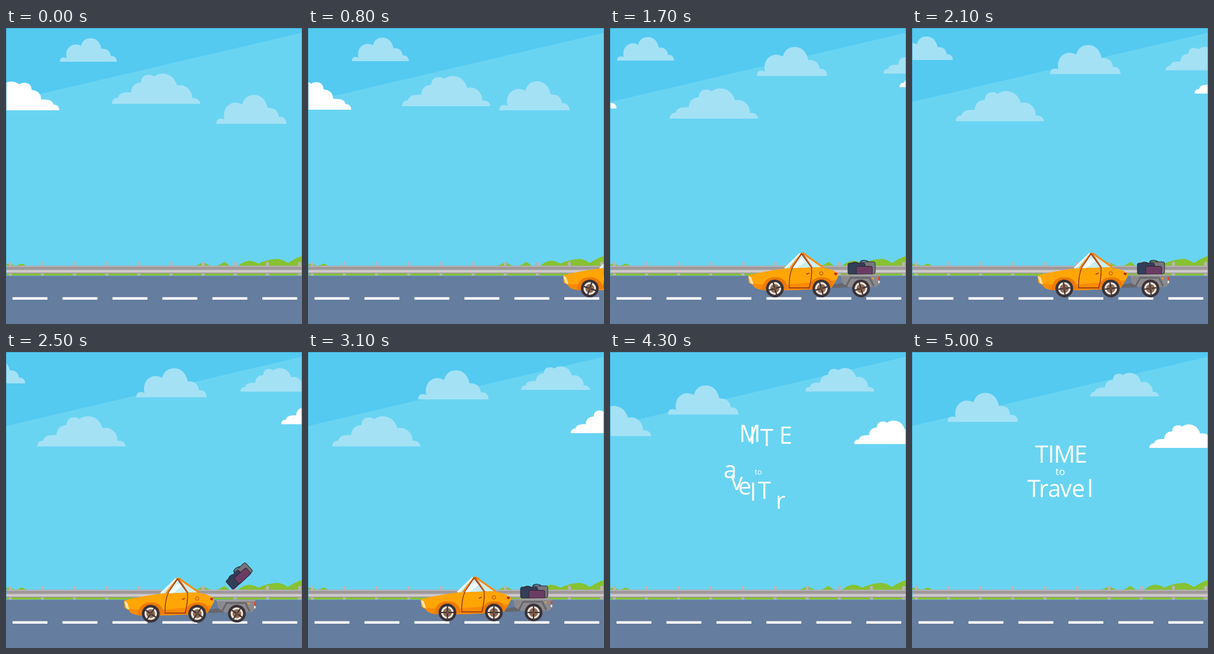
An HTML page for the animation above (5.1 s loop, 500 by 500 pixels).

```html
<!DOCTYPE html>
<html lang="en">
<head>
<meta charset="utf-8">
<title>Time to Travel</title>
<style>
html, body { margin: 0; width: 100%; height: 100%; overflow: hidden; background: #69d4f2; }
svg { display: block; width: 100vw; height: 100vh; }
text { font-family: "Open Sans", "Noto Sans", sans-serif; fill: #fff; text-anchor: middle; }
</style>
</head>
<body>
<svg viewBox="0 0 500 500" xmlns="http://www.w3.org/2000/svg">
  <defs>
    <g id="wheel">
      <circle r="15" fill="#3a3236"/>
      <circle r="10.6" fill="#efe6dc"/>
      <circle r="7.4" fill="#8d6a55"/>
      <path d="M-10.6 0H10.6M0-10.6V10.6" stroke="#3a3236" stroke-width="2.2"/>
      <circle r="2.6" fill="#6b4c3c"/>
    </g>
  </defs>
  <rect width="500" height="500" fill="#69d4f2"/>
  <path d="M0 0H500V8L0 125Z" fill="#54caf1"/>
  <g id="clouds"></g>
  <path fill="#86c232" d="M0 418V399Q6 396 13 401Q20 402 25 398Q30 398 34 402H318Q327 400 333 395Q340 400 346 402H356Q363 399 369 395Q374 398 378 402H392Q400 394 411 393Q420 394 426 398Q444 390 460 390Q470 392 476 397Q488 389 500 385V418Z"/>
  <rect y="401.500" width="500" height="13" fill="#b3adb0"/>
  <rect y="404.500" width="500" height="1.500" fill="#8f898d"/>
  <rect y="406" width="500" height="3" fill="#a7a1a4"/>
  <rect y="409" width="500" height="4.500" fill="#cfcacc"/>
  <rect y="413.500" width="500" height="1" fill="#918b8b"/>
  <g id="posts" fill="#bab4b8"></g>
  <rect y="418.500" width="500" height="82" fill="#657d9e"/>
  <g id="dashes" fill="#fff"></g>

  <g id="car">
    <g id="bags" stroke="#2a2530" stroke-width="1" stroke-linejoin="round">
      <path d="M-2-10Q-1-13 5-12.500Q11-12 12-9" fill="none" stroke-width="1.600"/>
      <rect x="-3" y="-10" width="26" height="20" rx="3" fill="#77767c"/>
      <path d="M-16-8Q-11-11-6-8" fill="none" stroke-width="1.500"/>
      <rect x="-23" y="-8" width="29" height="19" rx="3" fill="#333e58"/>
      <rect x="-9" y="-2.500" width="27" height="13.500" rx="2.500" fill="#6b3c63"/>
    </g>
    <path d="M92-5L112-9L124-7V-2L98-1Z" fill="#66666c"/>
    <path d="M111-23L168-24L176.500-23V-8L171-2.500H124L114-9Z" fill="#8b8a8e"/>
    <path d="M111-23L168-24L176.500-23V-21H111Z" fill="#a09fa3"/>
    <path d="M120-3L128-18H160L167-4" fill="none" stroke="#68676c" stroke-width="3"/>
    <circle cx="166" cy="-17" r="1.800" fill="#f59a23"/>
    <rect x="174.500" y="-20" width="2.600" height="6" fill="#e0442e"/>
    <rect x="174.500" y="-13" width="2.600" height="4" fill="#f0e4da"/>

    <path d="M18-34L42-59L46-60L60-52L81-36Z" fill="#c8eef0"/>
    <path d="M28-34L45-51L55-48L37-34Z" fill="#f2fdfd"/>
    <path d="M17-34L43-59" stroke="#eefcfc" stroke-width="3"/>
    <path d="M-45-22Q-25-28 18-34L78-36Q96-33 105-27Q109-24 106-18L96-2Q60 3 0 3L-18 3Q-34 1-36-5L-44-10Z" fill="#ffa506"/>
    <path d="M-41-9Q-20-5 25-7L104-14L96-2Q60 3 0 3L-18 3Q-34 1-36-5Z" fill="#f98a04"/>
    <path d="M-22 3Q-20-19 0-19Q20-19 22 1M56 2Q60-19 79-19Q97-19 98-4" fill="#ee7a06"/>
    <path d="M26-34L45-59Q49-60 54-55L81-36" fill="none" stroke="#f78b0a" stroke-width="3"/>
    <path d="M24-1Q24-24 30-36L45-58.500L62-35Q63-18 58-1Z" fill="none" stroke="#8c2c12" stroke-width="1.300"/>
    <path d="M47-59L63-35" stroke="#d35a0b" stroke-width="2"/>
    <path d="M53-24L58-26" stroke="#a33510" stroke-width="1.800"/>
    <circle cx="78.500" cy="-25.500" r="2.900" fill="none" stroke="#b1450e"/>
    <path d="M101-27L106-26L104-22L100-24Z" fill="#bb2f16"/>
    <path d="M-45-21L-40-19L-36-7L-41-9Z" fill="#fbe4b0"/>
    <use id="w0" href="#wheel"/>
    <use id="w1" href="#wheel"/>
    <use id="w2" href="#wheel"/>
  </g>

  <g id="words" font-size="40"></g>
  <text id="to" font-size="17" y="5">to</text>
  <path d="M.5 418V.5H499.500V418" fill="none" stroke="#3f9cc0" stroke-opacity=".75"/>
</svg>
<script>
const LOOP = 5100, STEP = 100;
const $ = id => document.getElementById(id);

function add(parent, tag, attrs, text) {
  const el = document.createElementNS("http://www.w3.org/2000/svg", tag);
  for (const k in attrs) el.setAttribute(k, attrs[k]);
  if (text) el.textContent = text;
  return parent.appendChild(el);
}

// Smooth curve through [time, value] points without overshoot
function curve(pts, t) {
  const n = pts.length - 1;
  if (t <= pts[0][0]) return pts[0][1];
  if (t >= pts[n][0]) return pts[n][1];
  const sec = i => (pts[i + 1][1] - pts[i][1]) / (pts[i + 1][0] - pts[i][0]);
  const tan = i => {
    if (i === 0) return sec(0);
    if (i === n) return sec(n - 1);
    const a = sec(i - 1), b = sec(i);
    return a * b > 0 ? 2 * a * b / (a + b) : 0;
  };
  let i = 0;
  while (t > pts[i + 1][0]) i++;
  const h = pts[i + 1][0] - pts[i][0], s = (t - pts[i][0]) / h, r = 1 - s;
  return (1 + 2 * s) * r * r * pts[i][1] + s * r * r * h * tan(i)
    + s * s * (3 - 2 * s) * pts[i + 1][1] - s * s * r * h * tan(i + 1);
}

// Cloud outlines: left end at x = 0, flat base at y = 0
const TALL = "M0 0Q0-9 8-9Q12-9 14-7Q11-19 17-28Q28-41 44-33Q48-49 65-49Q82-48 87-27Q104-28 106-12Q118-13 119 0Z";
const WIDE = "M0 0Q0-10 10-10Q12-19 24-19Q28-20 32-19Q33-35 49-36Q50-49 62-49Q68-49 71-46Q77-51 86-51Q104-50 110-31Q124-34 132-22Q136-16 135-10Q148-10 149 0Z";
const T = [0, 800, 1700, 2500, 3100, 3800, 5000];
const keys = vals => vals.map((v, i) => [T[i], v]);

const clouds = [
  { d: TALL, s: .81, x: [91, 74, 12, -64, -95, -125, -150], y: [57, 56, 55, 53, 52, 51, 50] },
  { d: WIDE, s: 1, x: [179, 159, 101, 53, 41, -25, -160], y: [128, 132, 153, 159.5, 159.5, 150, 130] },
  { d: TALL, s: 1, x: [355, 323, 248, 220, 186, 128, 60], y: [162, 139, 81, 76.5, 80, 96, 118] },
  { d: WIDE, s: .78, x: [545, 525, 462, 396, 360, 347, 301], y: [88, 86, 77, 67, 64, 63.5, 75] },
  { d: WIDE, s: .95, flip: true, white: true, x: [90, 73, 11, -10, -20, -30, -40], y: [139, 138, 136, 135, 135, 135, 135] },
  { d: WIDE, s: .78, white: true, x: [530, 515, 489, 465, 444, 422, 401], y: [75, 80, 100, 122, 137, 150, 162] }
].map(c => ({
  el: add($("clouds"), "path", { d: c.d, fill: c.white ? "#fff" : "#a4e1f5" }),
  s: c.s, flip: c.flip ? -1 : 1, x: keys(c.x), y: keys(c.y)
}));

for (let i = 0; i < 10; i++) {
  const x = 4.7 + i * 54.3;
  add($("posts"), "rect", { x, y: 395, width: 5, height: 7, rx: 2 });
  add($("posts"), "rect", { x, y: 414.5, width: 5, height: 4 });
}
for (let i = 0; i < 6; i++)
  add($("dashes"), "rect", { x: 11 + i * 84.4, y: 454.7, width: 59, height: 4.2 });

// Glyph, resting x and baseline, then a point passed on the way in
const letters = [
  ["T", 219, 187, 383, 86], ["I", 235, 187, 255, 72], ["M", 257.5, 187, 182, 62], ["E", 285, 187, 327, 73],
  ["T", 206, 245, 402, 256], ["r", 222.5, 245, 457, 317], ["a", 240.5, 245, 106, 130],
  ["v", 260, 245, 97, 202], ["e", 281, 245, 91, 230], ["l", 301, 245, 90, 265]
].map(([ch, x, y, px, py]) => ({ el: add($("words"), "text", {}, ch), x, y, dx: px - x, dy: py - y }));

const CAR = [[300, 840], [600, 590], [800, 476], [1200, 346], [1700, 278.5], [2500, 244.5],
  [3100, 235.5], [3400, 208], [3800, 88.5], [4300, -200], [4600, -420]];
const DIP = [[2150, 0], [2500, 2], [2850, 0]];
const LIFT = [[2100, 0], [2500, 29], [2900, 0]];
const TILT = [[2100, 0], [2500, -42], [2900, 0]];
const GATHER = [[3100, 2.7], [3800, 1], [4300, .28], [4700, 0]];

const set = (el, value) => el.setAttribute("transform", value);

function draw(t) {
  for (const c of clouds)
    set(c.el, `translate(${curve(c.x, t)} ${curve(c.y, t)}) scale(${c.s * c.flip} ${c.s})`);

  const x = curve(CAR, t);
  set($("car"), `translate(${x} ${440 + curve(DIP, t)})`);
  [0, 78.5, 145.5].forEach((wx, i) =>
    set($("w" + i), `translate(${wx} 0) rotate(${(x - 235.5) / 15 * 180 / Math.PI})`));
  const lift = curve(LIFT, t);
  set($("bags"), `translate(${146.5 + lift * .08} ${-35 - lift}) rotate(${curve(TILT, t)})`);

  const k = curve(GATHER, t);
  $("words").style.display = t > 3100 ? "" : "none";
  for (const l of letters) set(l.el, `translate(${l.x + l.dx * k} ${l.y + l.dy * k})`);
  const grow = Math.max(0, Math.min(1, (t - 3000) / 1750));
  $("to").style.display = grow ? "" : "none";
  set($("to"), `translate(250.5 203) scale(${grow})`);
}

const start = performance.now();
function frame() {
  const t = (performance.now() - start) % LOOP;
  draw(Math.floor(t / STEP) * STEP);
  requestAnimationFrame(frame);
}
frame();
</script>
</body>
</html>
```
